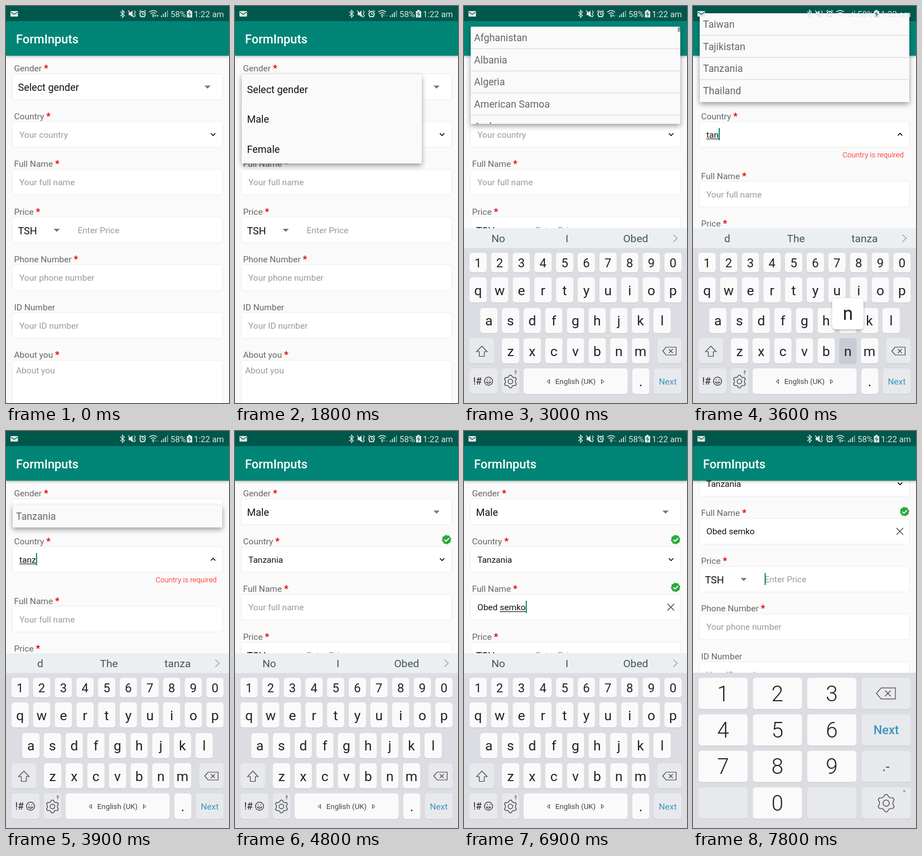
Recreate the animation shown at these times as an HTML page. Size 400 by 711 pixels, loop 8 s.

```html
<!DOCTYPE html>
<html lang="en">
<head>
<meta charset="utf-8">
<title>Form inputs</title>
<style>
html, body { margin: 0; width: 100%; height: 100%; overflow: hidden; background: #fafafa; }
svg { display: block; width: 400px; height: 711px; font-family: Roboto, "Noto Sans", sans-serif; }
text { white-space: pre; }
</style>
</head>
<body>
<svg id="stage" viewBox="0 0 400 711"></svg>
<script>
const LOOP = 8000;
const TEAL = '#008577', ROW = 39.6, PITCH = 85.5, KEY_PITCH = 38.85;
const stage = document.getElementById('stage');
const pen = document.createElement('canvas').getContext('2d');

const COUNTRIES = ['Afghanistan', 'Albania', 'Algeria', 'American Samoa', 'Andorra', 'Angola',
  'Anguilla', 'Antarctica', 'Antigua and Barbuda', 'Argentina', 'Armenia', 'Aruba'];
const T_COUNTRIES = ['Taiwan', 'Tajikistan', 'Tanzania', 'Thailand'];
const IDLE_WORDS = ['No', 'I', 'Obed'];

// Each entry changes part of the state from its time on.
const STEPS = [
  [0, { gender: 'Select gender', country: '', name: '', words: IDLE_WORDS, scroll: 0, up: 1, down: 1 }],
  [300, { up: 0, down: 0 }],
  [1200, { up: 1 }],
  [1500, { genderOpen: true }],
  [1800, { up: 0 }],
  [2400, { genderOpen: false, gender: 'Male' }],
  [2700, { list: { y: 252, h: 470, items: COUNTRIES, bar: true }, up: 1 }],
  [3000, { list: { y: 37, h: 174, items: COUNTRIES, bar: true }, keys: 'letters' }],
  [3300, { list: { y: 13, h: 159, items: T_COUNTRIES }, country: 't', focus: 'country', error: true, press: 't' }],
  [3600, { country: 'tan', open: true, words: ['d', 'The', 'tanza'], press: 'n', held: true, up: 0 }],
  [3900, { list: { y: 133, h: ROW, items: ['Tanzania'] }, country: 'tanz', press: '', held: false }],
  [4200, { list: { y: 252, h: ROW, items: ['Tanzania'] }, up: 1 }],
  [4500, { list: null, country: 'Tanzania', open: false, error: false, countryOk: true,
    words: ['Tanzania', 'Tanzanian', 'Tanzania’s'] }],
  [4800, { focus: '', words: IDLE_WORDS, up: 0 }],
  [5100, { focus: 'name', caps: true }],
  [5400, { press: 'o', held: true, up: 1 }],
  [5700, { name: 'Ob', nameOk: true, caps: false, press: '', held: false, up: 0 }],
  [6000, { name: 'Obe', press: 'e' }],
  [6300, { name: 'Obed s', press: 's', held: true, up: 1, down: 1 }],
  [6600, { name: 'Obed se', press: 'e', held: false }],
  [6900, { name: 'Obed semko', press: '', up: 0, down: 0 }],
  [7200, { scroll: 84, scrollbar: true }],
  [7500, { scroll: 135.7 }],
  [7800, { focus: 'price', keys: 'digits', scrollbar: false, up: 1 }]
];

const text = (x, y, s, size, fill, extra = '') =>
  `<text x="${x}" y="${y}" font-size="${size}" fill="${fill}" ${extra}>${s}</text>`;
const centred = (x, y, s, size, fill, extra = '') => text(x, y, s, size, fill, 'text-anchor="middle" ' + extra);
const rect = (x, y, w, h, fill, extra = '') =>
  `<rect x="${x}" y="${y}" width="${w}" height="${h}" fill="${fill}" ${extra}/>`;
const path = (d, fill, extra = '') => `<path d="${d}" fill="${fill}" ${extra}/>`;
const line = (d, colour, width = 1.3) => path(d, 'none', `stroke="${colour}" stroke-width="${width}"`);
const widthOf = s => {
  pen.font = '15.5px Roboto, "Noto Sans", sans-serif';
  return pen.measureText(s).width;
};

// Closed ring whose radius follows the given cycle, repeated n times.
function ring(cx, cy, n, radii) {
  const total = n * radii.length;
  const points = Array.from({ length: total }, (_, i) => {
    const a = (i - 0.5) / total * 2 * Math.PI, r = radii[i % radii.length];
    return (cx + r * Math.sin(a)).toFixed(2) + ' ' + (cy - r * Math.cos(a)).toFixed(2);
  });
  return 'M' + points.join('L') + 'Z';
}

const gear = (x, y, r) =>
  line(ring(x, y, 6, [r, r, r * .78, r * .78]), '#444') +
  `<circle cx="${x}" cy="${y}" r="${r * .36}" fill="none" stroke="#444" stroke-width="1.3"/>`;

const badge = y =>
  path(ring(379.5, y, 8, [8, 6.8]), '#2ba83a', 'stroke="#2ba83a" stroke-width="1.2" stroke-linejoin="round"') +
  line(`M375.5 ${y}l3 3 5.500-5.500`, '#fff', 1.8);

const triangle = (x, y) => path(`M${x - 5.5} ${y}h11l-5.500 5.500z`, '#757575');

const erase = (x, y, k) =>
  line(`M${x - 12 * k} ${y}l${6 * k} ${-7 * k}h${18 * k}v${14 * k}h${-18 * k}z` +
    `M${x - k} ${y - 3.5 * k}l${7 * k} ${7 * k}m0 ${-7 * k}l${-7 * k} ${7 * k}`, '#444', 1.2);

function typed(value, y, active) {
  let out = text(24, y + 5.5, value, 15.5, '#111');
  if (!active) return out;
  const end = 24 + widthOf(value);
  const start = 24 + widthOf(value.slice(0, value.lastIndexOf(' ') + 1));
  if (end > start) out += rect(start, y + 7.5, end - start, 1.1, '#111');
  return out + rect(end, y - 11.5, 2, 22, TEAL);
}

function form(s) {
  const hint = (x, y, words) => text(x, y + 5.5, words, 15.5, '#999');
  const labels = ['Gender *', 'Country *', 'Full Name *', 'Price *', 'Phone Number *', 'ID Number', 'About you *'];
  const contents = [
    y => text(21.5, y + 7.5, s.gender, 18, '#111') + triangle(361.5, y - 2),
    y => (s.country ? typed(s.country, y, s.focus === 'country') : hint(24, y, 'Your country')) +
      line(s.open ? `M367.500 ${y + 2}l4-4 4 4` : `M367.500 ${y - 2}l4 4 4-4`, '#111', 1.7) +
      (s.error ? text(378, y + 40.5, 'Country is required', 13.3, '#f00', 'text-anchor="end" font-weight="300"') : '') +
      (s.countryOk ? badge(y - 35.5) : ''),
    y => (s.name || s.focus === 'name' ? typed(s.name, y, s.focus === 'name') : hint(24, y, 'Your full name')) +
      (s.nameOk ? badge(y - 35.5) + line(`M365 ${y - 6}l12 12m0-12l-12 12`, '#444', 1.3) : ''),
    y => text(21.5, y + 7.5, 'TSH', 18, '#111') + triangle(91, y - 2) + hint(128.5, y, 'Enter Price') +
      (s.focus === 'price' ? rect(128.5, y - 11, 2, 21.5, TEAL) : ''),
    y => hint(24, y, 'Your phone number'),
    y => hint(24, y, 'Your ID number'),
    y => hint(18, y - 5.5, 'About you')
  ];
  return labels.map((label, i) => {
    const y = 144.5 + PITCH * i - s.scroll + (s.error && i > 1 ? 21.5 : 0);
    const title = label.replace('*', '<tspan fill="#e00000" font-weight="700" font-size="17">*</tspan>');
    return text(14.5, y - 27.5, title, 15.5, '#666') +
      rect(11.5, y - 23, 377, i === 6 ? 120 : 46, '#fff', 'rx="3" stroke="#ececec"') + contents[i](y);
  }).join('');
}

function header() {
  return rect(0, 0, 400, 89, TEAL, 'filter="url(#bar)"') + rect(0, 0, 400, 27, '#00574b') +
    text(18, 66.5, 'FormInputs', 21.8, '#fff', 'font-weight="500"');
}

function status(s) {
  const ink = '#dce9e7';
  const bars = [3, 6, 9, 12].map((h, i) => rect(278 + 3.6 * i, 20 - h, 1.7, h, ink, i === 3 ? 'opacity=".6"' : '')).join('');
  return rect(8, 9, 13.5, 10, ink, 'rx="1"') + line('M9 11l5.800 4 5.800-4', '#00574b', 1.4) +
    line('M205 10l7.500 7-3.700 3.500v-13l3.700 3.500-7.500 7', ink, 1.3) +
    path('M220 11.500h3l4-3.500v12l-4-3.500h-3z', ink) + line('M219 8l11 12M230 8l2 3-2 3 2 3-2 3', ink, 1.3) +
    `<circle cx="245" cy="14.500" r="4.700" fill="none" stroke="${ink}" stroke-width="2"/>` +
    line('M245 11.500v3.200h2.500M239 10l3-2.500M251 10l-3-2.500M241 20l1.500-1.500M249 20l-1.500-1.500', ink, 1.4) +
    line('M257 11q7-6 14 0M259.500 14q4.500-4 9 0M262 16.800q2-1.800 4 0', ink, 1.5) +
    `<circle cx="264" cy="19" r="1.300" fill="${ink}"/>` +
    path('M266 18.500l2-3 2 3z', ink, `opacity="${s.up ? 1 : .3}"`) +
    path('M270 16.500h4l-2 3z', ink, `opacity="${s.down ? 1 : .3}"`) +
    bars + text(295, 20, '58%', 15, ink) +
    path('M327 7h4v2h3v11.500h-9.500v-11.500h2.500z', ink) + line('M330 10.500l-2.500 4h3.500l-2.500 4', '#00574b', 1.2) +
    text(391, 20, '1:22 am', 15, ink, 'text-anchor="end"');
}

function genderMenu() {
  return rect(12, 122, 323, 160, '#fafafa', 'rx="2" filter="url(#float)"') +
    ['Select gender', 'Male', 'Female'].map((item, i) => text(21.5, 156 + 53.4 * i, item, 18, '#111')).join('');
}

function countryList({ y, h, items, bar }) {
  const rows = items.map((item, i) => text(18, y + ROW * i + 26.2, item, 17.8, '#666') +
    (i ? rect(12, y + ROW * i - .5, 376, 1, '#d4d4d4') : '')).join('');
  return rect(12, y, 376, h, '#fafafa', 'rx="2" filter="url(#float)"') +
    `<clipPath id="list">${rect(12, y, 376, h, '#000')}</clipPath><g clip-path="url(#list)">${rows}</g>` +
    (bar ? rect(383.5, y + 1, 4.5, 8, '#999') : '');
}

const key = (x, y, w, h, fill = '#fafafa') =>
  rect(x, y + 1, w, h, '#c6c8ce', 'rx="5"') + rect(x, y, w, h, fill, 'rx="5"');
const SOFT = '#e8e9ed', DARK = '#222', BLUE = '#3a96bb';

const LETTER_ROWS = [
  { chars: '1234567890', x: 25.2, y: 442, h: 35, base: 467.5, size: 22 },
  { chars: 'qwertyuiop', x: 25.2, y: 486, h: 45, base: 518, size: 24.5 },
  { chars: 'asdfghjkl', x: 44.6, y: 541, h: 45, base: 572, size: 24.5 },
  { chars: 'zxcvbnm', x: 83.5, y: 595, h: 45, base: 626.5, size: 24.5 }
];

function letterKeys(s) {
  const shown = c => s.caps ? c.toUpperCase() : c;
  let bubble = '';
  let out = rect(0, 398, 400, 313, '#dcdde2') + rect(0, 398, 400, 35.5, '#eceff1') +
    s.words.map((w, i) => centred(61.5 + 123.2 * i, 423, w, 19.2, '#455')).join('') +
    line('M375.500 409.500l7 6.500-7 6.500', '#999', 1.2);
  for (const row of LETTER_ROWS) {
    [...row.chars].forEach((c, i) => {
      const x = row.x + KEY_PITCH * i, pressed = s.press === c;
      out += key(x - 15.5, row.y, 31, row.h, pressed && s.held ? '#c9ccd2' : undefined) +
        centred(x, row.base, shown(c), row.size, DARK);
      if (pressed) bubble = rect(x - 28, row.y - 72, 56, 56, '#fff', 'rx="7" filter="url(#bar)"') +
        centred(x, row.y - 33, shown(c), 33, DARK);
    });
  }
  out += key(10, 595, 44, 45, SOFT) + path('M32 609l9.500 10h-5v8.500h-9v-8.500h-5z', s.caps ? BLUE : 'none', 'stroke="#444" stroke-width="1.2"') +
    key(346.5, 595, 44, 45, SOFT) + erase(368.5, 618, 1) +
    key(10, 649, 50, 46, SOFT) + text(16.5, 678, '!#', 17.5, DARK) +
    '<circle cx="44" cy="672" r="7.300" fill="none" stroke="#333" stroke-width="1.300"/>' +
    line('M40 673.500q4 6 8 0zM41.500 668.500v2M46.500 668.500v2', '#333', 1.2) +
    key(68, 649, 31, 46, SOFT) + gear(83.3, 672.5, 11.5) + rect(91, 652, 3.5, 6, '#999', 'rx="1.700"') +
    line('M92.700 658v3', '#999', 1) +
    key(107, 649, 186.5, 46) + centred(200, 677, 'English (UK)', 13.3, '#444') +
    line('M153.500 669l-4.500 3.500 4.500 3.500zM246.500 669l4.500 3.500-4.500 3.500z', '#333', 1) +
    key(302, 649, 30.5, 46) + centred(317, 681, '.', 25, DARK) +
    key(340.5, 649, 50, 46, SOFT) + centred(365.5, 677.5, 'Next', 15.5, BLUE);
  return out + bubble;
}

function digitKeys() {
  const cell = (col, row) => [10 + 97.5 * col, 442 + 65.4 * row];
  let out = rect(0, 433, 400, 278, '#dcdde2');
  for (let row = 0; row < 4; row++) {
    for (let col = 0; col < 4; col++) {
      const [x, y] = cell(col, row);
      const digit = row < 3 && col < 3 ? row * 3 + col + 1 : row === 3 && col === 1 ? 0 : '';
      out += key(x, y, 88, 56, digit === '' ? SOFT : undefined) +
        centred(x + 44, y + 41.5, digit, 38.5, DARK, 'font-weight="300"');
    }
  }
  return out + erase(346, 470, 1.42) + centred(346.5, 543, 'Next', 21.8, BLUE, 'font-weight="500"') +
    centred(346, 609, '.-', 24, '#444') + gear(346.5, 666.5, 15.5) + '<circle cx="379" cy="645" r="2.200" fill="#aaa"/>';
}

const DEFS = `<defs>
<filter id="bar" x="-30%" y="-30%" width="160%" height="170%"><feDropShadow dx="0" dy="1.5" stdDeviation="2" flood-opacity=".3"/></filter>
<filter id="float" filterUnits="userSpaceOnUse" x="-20" y="-20" width="440" height="760"><feDropShadow dx="0" dy="4" stdDeviation="5" flood-opacity=".38"/></filter>
</defs>`;

function scene(s) {
  return DEFS + rect(0, 0, 400, 711, '#fafafa') + form(s) +
    (s.scrollbar ? rect(396, 89 + s.scroll * .5, 4, 170, '#000', 'opacity=".25"') : '') +
    header() +
    (s.genderOpen ? genderMenu() : '') + (s.list ? countryList(s.list) : '') + status(s) +
    (s.keys === 'letters' ? letterKeys(s) : s.keys === 'digits' ? digitKeys() : '');
}

let shown = -1;
const began = performance.now();
function draw() {
  const t = (performance.now() - began) % LOOP;
  const past = STEPS.filter(([at]) => at <= t);
  if (past.length !== shown) {
    shown = past.length;
    stage.innerHTML = scene(Object.assign({}, ...past.map(([, change]) => change)));
  }
  requestAnimationFrame(draw);
}
draw();
</script>
</body>
</html>
```
